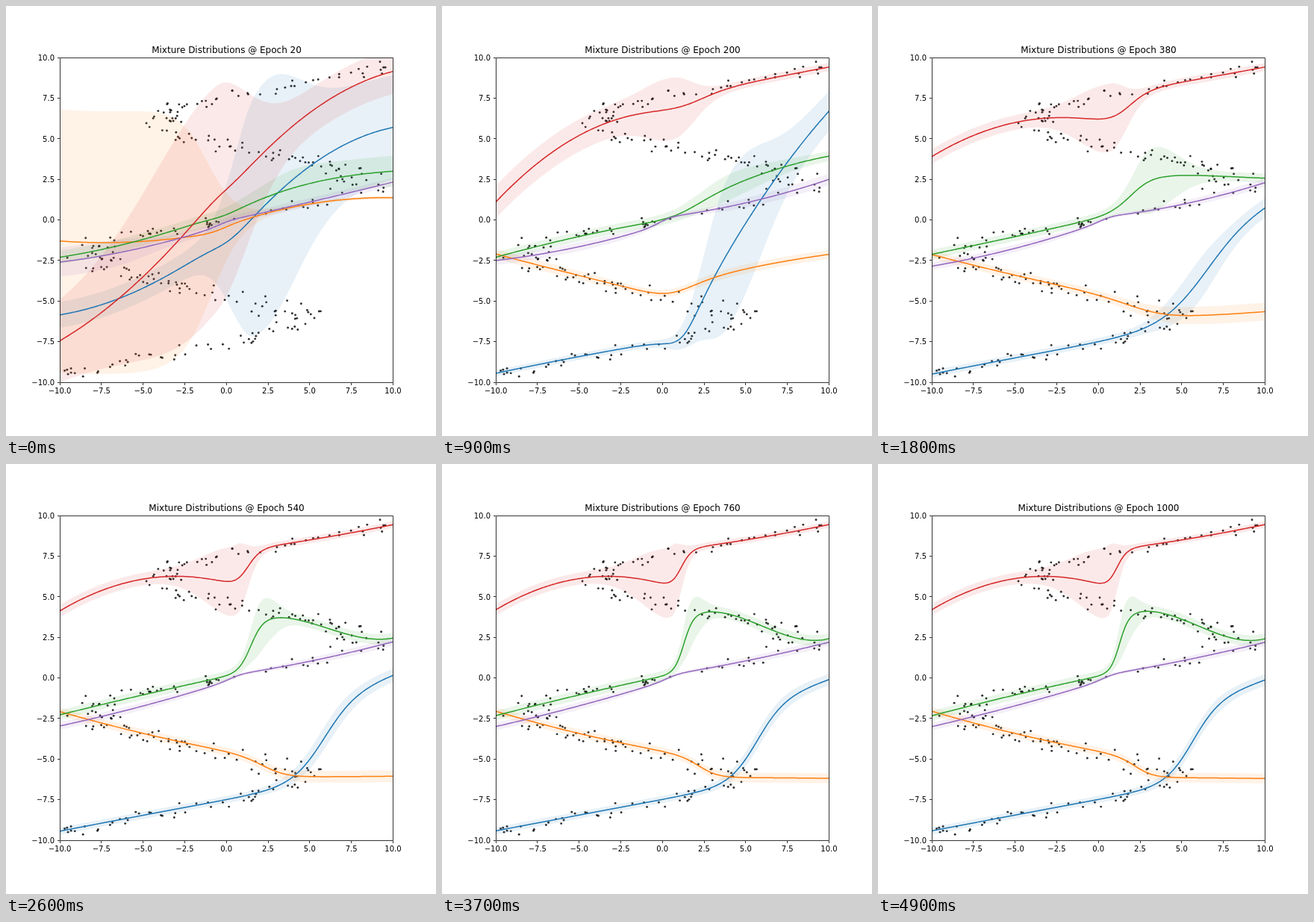
An HTML page with a canvas for the animation above (5 s loop, 576x576 px).

```html
<!DOCTYPE html>
<html lang="en">
<head>
<meta charset="utf-8">
<title>Mixture Distributions</title>
<style>
html, body { margin: 0; width: 100%; height: 100%; overflow: hidden; background: #fff; }
canvas { display: block; }
</style>
</head>
<body>
<canvas id="plot" width="576" height="576"></canvas>
<script>
const ctx = document.getElementById('plot').getContext('2d');
const box = { left: 72, right: 518.4, top: 69.12, bottom: 504 };
const px = x => box.left + (box.right - box.left) * (x + 10) / 20;
const py = y => box.bottom - (box.bottom - box.top) * (y + 10) / 20;

// Each curve passes through four training stages.
// mean: [left branch, right branch, centre, width of the switch between them];
//   a branch is given by evenly spaced heights over -10..0 or 0..10.
// spread: [left level, right level, peak, centre, left width, right width]
const stages = [20, 200, 380, 1000];
const curves = [
  { color: '#1f77b4',
    mean: [
      [[-5.85, -4.2, -.95], [-1.8, 3.3, 5.7], 0, 1.2],
      [[-9.45, -8.42, -7.5], [-9.5, -.2, 6.7], 1.3, 1],
      [[-9.5, -8.5, -7.55], [-3, -.9, 1.2], 6.3, 2.8],
      [[-9.42, -8.45, -7.49], [-3.5, -1.8, -.1], 5.6, 1.65]],
    spread: [
      [.8, 3.2, 5.4, 1.7, 1.9, 3.3],
      [.2, 1.2, 3.9, 3.9, 1.9, 2.8],
      [.22, .6, .85, 5.8, 2.3, 2],
      [.22, .35, .2, 5.8, 2, 2]] },
  { color: '#ff7f0e',
    mean: [
      [[-1.3, -1.32, -.65], [-.35, .98, 1.37], -.5, 1],
      [[-2.1, -3.42, -4.65], [-4.2, -3, -2.12], .85, 1.74],
      [[-2.13, -3.4, -4.5], [-6.1, -5.95, -5.65], 2.73, 2.35],
      [[-2.05, -3.42, -4.5], [-6.15, -6.15, -6.2], 2.35, 1.13]],
    spread: [
      [8.1, .1, 0, -1, 4, 3],
      [.3, .28, -.08, -1, 4, 3],
      [.26, .55, 0, 3, 4, 3],
      [.25, .3, 0, 3, 4, 3]] },
  { color: '#2ca02c',
    mean: [
      [[-2.3, -1.2, .5], [.25, 1.75, 2.6, 3], -.4, 1],
      [[-2.3, -1.02, 0], [.12, 1.8, 3.07, 3.93], 1.35, 1.8],
      [[-2.12, -1.03, .1], [2.3, 2.72, 2.72, 2.57], 2.05, 1.3],
      [[-2.33, -1.05, .1], [2.67, 4.08, 2.92, 2.42], 1.25, .55]],
    spread: [
      [.4, .95, .4, 3.5, 2.5, 2.5],
      [.3, .3, .5, 4, 2.5, 3],
      [.28, .28, 1.7, 3.2, 1.4, 2.1],
      [.3, .33, 1.1, 1.6, .55, .9]] },
  { color: '#d62728',
    mean: [
      [[-7.45, -3.5, 2.3], [1.6, 6.6, 9.15], -.2, 1],
      [[1.1, 5.2, 6.65], [7.5, 8.45, 9.42], 1.69, 1.71],
      [[3.9, 6, 6.1], [7.7, 8.5, 9.42], 1.61, 1.26],
      [[4.2, 6.12, 5.78], [7.8, 8.5, 9.45], 1.05, .6]],
    spread: [
      [2.1, 1.4, 5.2, -.6, 6, 2.7],
      [1, .25, 1.25, .8, 2.2, 1.6],
      [.45, .25, 1.75, .7, 2.5, 1.3],
      [.35, .2, 1.9, .6, 2.6, .75]] },
  { color: '#9467bd',
    mean: [
      [[-2.6, -1.7, -.25], [-.05, 1.1, 2.33], -.2, .8],
      [[-2.5, -1.65, -.3], [.15, 1.05, 2.5], 0, .8],
      [[-2.85, -1.75, -.2], [.15, .95, 2.3], .5, .8],
      [[-3, -1.72, -.25], [.12, 1.05, 2.2], .5, .8]],
    spread: [
      [.9, .25, 0, -5, 3, 4],
      [.27, .35, -.18, 1, 3, 4],
      [.23, .25, -.13, 1, 3, 4],
      [.23, .25, -.13, 1, 3, 4]] }];

const mix = (a, b, u) => Array.isArray(a) ? a.map((v, i) => mix(v, b[i], u)) : a + (b - a) * u;
const step = (x, centre, width) => (1 + Math.tanh((x - centre) / width)) / 2;

// Polynomial through heights spaced evenly over 0..1 (Neville's scheme)
function through(heights, u) {
  const p = [...heights], n = p.length, t = u * (n - 1);
  for (let m = 1; m < n; m++)
    for (let i = 0; i < n - m; i++)
      p[i] = ((i + m - t) * p[i] + (t - i) * p[i + 1]) / m;
  return p[0];
}

const meanAt = ([left, right, centre, width], x) =>
  mix(through(left, x / 10 + 1), through(right, x / 10), step(x, centre, width));

const spreadAt = ([left, right, peak, centre, wl, wr], x) =>
  mix(left, right, step(x, centre, 1.8))
  + peak * Math.exp(-(((x - centre) / (x < centre ? wl : wr)) ** 2));

// Parameters at an epoch: logarithmic progress, settling in the last stage
function at(rows, epoch) {
  const last = stages.length - 2;
  let i = 0;
  while (i < last && epoch > stages[i + 1]) i++;
  const u = Math.log(epoch / stages[i]) / Math.log(stages[i + 1] / stages[i]);
  return mix(rows[i], rows[i + 1], i === last ? 1 - (1 - u) ** 3 : u);
}

// Noisy samples of x = 7 sin(0.75 y) + y / 2
let seed = 2024;
const random = () => (seed = seed * 16807 % 2147483647) / 2147483647;
const gauss = () => Math.sqrt(-2 * Math.log(random())) * Math.cos(2 * Math.PI * random());
const samples = Array.from({ length: 300 }, () => {
  const y = 20 * random() - 10;
  return [7 * Math.sin(.75 * y) + y / 2 + gauss(), y];
});

const grid = Array.from({ length: 224 }, (_, i) => -10 + i * 20 / 223);

function trace(points) {
  ctx.beginPath();
  points.forEach(([x, y]) => ctx.lineTo(px(x), py(y)));
}

function drawAxes() {
  ctx.strokeStyle = ctx.fillStyle = '#000';
  ctx.lineWidth = .8;
  ctx.font = '10px "DejaVu Sans", sans-serif';
  ctx.beginPath();
  ctx.rect(72.5, 69.5, 446, 435);
  for (let v = -10; v <= 10; v += 2.5) {
    const label = v.toFixed(1).replace('-', '\u2212');
    const x = Math.floor(px(v)) + .5, y = Math.floor(py(v)) + .5;
    ctx.moveTo(x, 505);
    ctx.lineTo(x, 508);
    ctx.moveTo(72, y);
    ctx.lineTo(69, y);
    ctx.textAlign = 'center';
    ctx.fillText(label, px(v), 519);
    ctx.textAlign = 'right';
    ctx.fillText(label, 65, Math.round(py(v) + 3.8));
  }
  ctx.stroke();
}

function draw(epoch) {
  ctx.fillStyle = '#fff';
  ctx.fillRect(0, 0, 576, 576);
  ctx.save();
  ctx.beginPath();
  ctx.rect(box.left, box.top, box.right - box.left, box.bottom - box.top);
  ctx.clip();

  ctx.fillStyle = 'rgba(0,0,0,.82)';
  for (const [x, y] of samples) {
    ctx.beginPath();
    ctx.arc(px(x), py(y), 1.45, 0, 2 * Math.PI);
    ctx.fill();
  }

  const shapes = curves.map(({ color, mean, spread }) => {
    const m = at(mean, epoch), s = at(spread, epoch);
    return { color, points: grid.map(x => [x, meanAt(m, x), spreadAt(s, x)]) };
  });
  ctx.globalAlpha = .1;
  for (const { color, points } of shapes) {
    const upper = points.map(([x, y, s]) => [x, y + s]);
    const lower = points.map(([x, y, s]) => [x, y - s]);
    trace(upper.concat(lower.reverse()));
    ctx.fillStyle = color;
    ctx.fill();
  }
  ctx.globalAlpha = 1;
  ctx.lineWidth = 1.5;
  ctx.lineJoin = 'round';
  for (const { color, points } of shapes) {
    trace(points);
    ctx.strokeStyle = color;
    ctx.stroke();
  }
  ctx.restore();

  drawAxes();
  ctx.font = '12px "DejaVu Sans", sans-serif';
  ctx.textAlign = 'center';
  ctx.fillText('Mixture Distributions @ Epoch ' + epoch, 295.5, 63);
}

let shown = 0;
function tick() {
  const epoch = 20 * (1 + Math.floor(performance.now() % 5000 / 100));
  if (epoch !== shown) draw(shown = epoch);
  requestAnimationFrame(tick);
}
tick();
</script>
</body>
</html>
```
